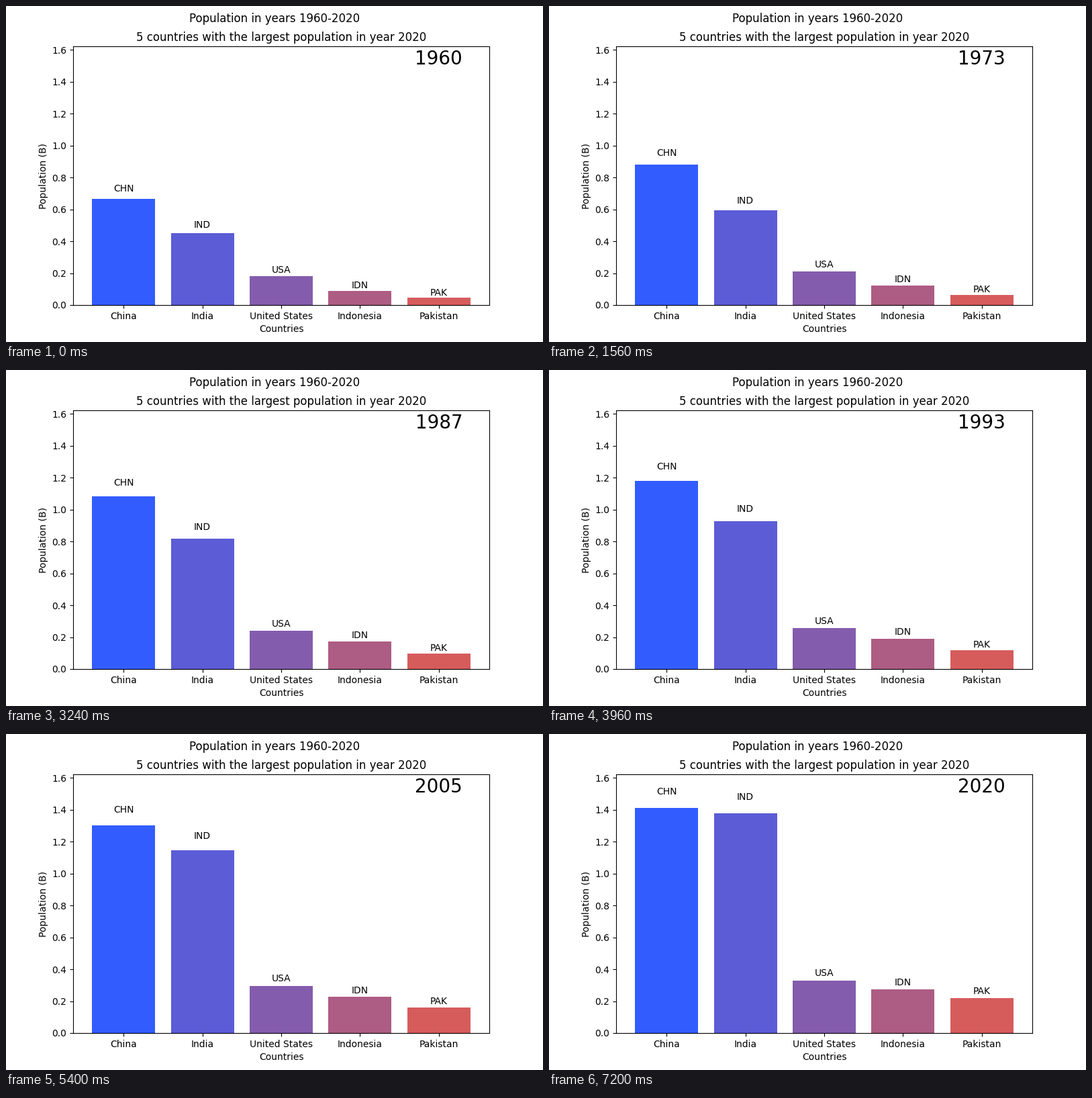
A matplotlib script that plays this animation: 800x500 px, repeating every 7.32 s.

```python
import matplotlib.pyplot as plt
import numpy as np
from matplotlib.animation import FuncAnimation

plt.rcParams["font.family"] = "DejaVu Sans"

YEARS = np.arange(1960, 2021)
DECADES = YEARS[::10]
# Uneven steps: a dip in the early sixties, then several changes of pace
CHINA_YEARS = [1960, 1961, 1962, 1965, 1970, 1975, 1980, 1985, 1990, 2000, 2010, 2015, 2020]

# Name, code, key years and population in millions at those years
COUNTRIES = [
    ("China", "CHN", CHINA_YEARS, [667.1, 660.3, 665.8, 715.2, 818.3, 916.4, 981.2,
                                   1051, 1135.2, 1262.6, 1337.7, 1379.9, 1411.1]),
    ("India", "IND", DECADES, [450.5, 555.2, 698.9, 873.3, 1056.6, 1234.3, 1380]),
    ("United States", "USA", DECADES, [180.7, 205.1, 227.2, 249.6, 282.2, 309.3, 329.5]),
    ("Indonesia", "IDN", DECADES, [87.8, 114.8, 147.4, 181.4, 211.5, 241.8, 273.5]),
    ("Pakistan", "PAK", DECADES, [45.0, 58.1, 78.1, 107.6, 142.3, 179.5, 220.9]),
]


def yearly(years, millions):
    """Smooth cubic Hermite curve through the key points, in billions per year."""
    x, p = np.array(years, float), np.array(millions) / 1000
    slope = np.gradient(p, x, edge_order=2)
    i = np.clip(np.searchsorted(x, YEARS, side="right") - 1, 0, len(x) - 2)
    step = x[i + 1] - x[i]
    t = (YEARS - x[i]) / step
    ease = t * t * (3 - 2 * t)
    bend = t * (1 - t) * ((1 - t) * slope[i] - t * slope[i + 1])
    return p[i] + (p[i + 1] - p[i]) * ease + step * bend


names, codes, *_ = zip(*COUNTRIES)
values = np.array([yearly(years, millions) for *_, years, millions in COUNTRIES])
peak = values.max()
colors = [(0.2 * k, 0.2, 1 - 0.2 * k) for k in range(len(names))]

fig, ax = plt.subplots(figsize=(8, 5), dpi=100)
fig.suptitle("Population in years 1960-2020")
ax.set_title("5 countries with the largest population in year 2020")
ax.set_xlabel("Countries")
ax.set_ylabel("Population (B)")

bars = ax.bar(names, values[:, 0], color=colors, alpha=0.8)
labels = [ax.text(k, 0, code, ha="center", va="bottom") for k, code in enumerate(codes)]
year_text = ax.text(4, peak * 1.05, "", ha="center", va="bottom", fontsize=20)
ax.set_ylim(0, peak * 1.15)


def update(frame):
    for bar, label, value in zip(bars, labels, values[:, frame]):
        bar.set_height(value)
        label.set_y(value * 1.05)
    year_text.set_text(str(YEARS[frame]))
    return [*bars, *labels, year_text]


anim = FuncAnimation(fig, update, frames=len(YEARS), interval=120,
                     repeat=True, repeat_delay=0)
plt.show()
```
